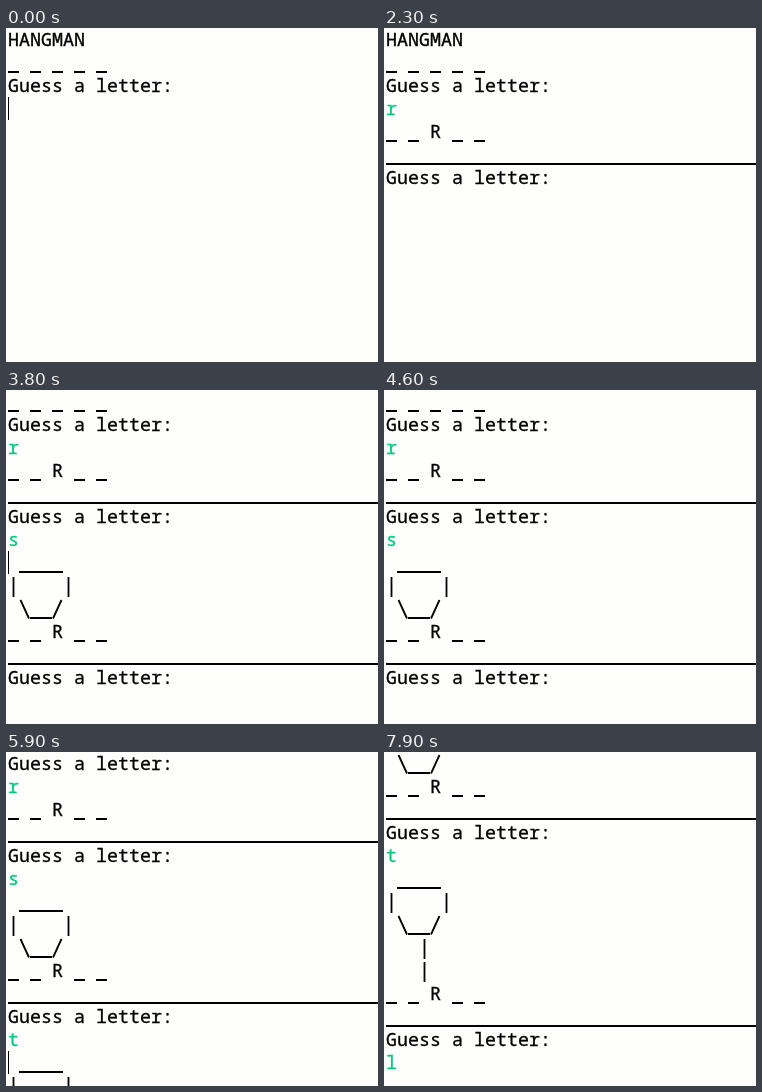
Animation of 372 by 334 pixels, one loop 8 s. Source, as an HTML page:

```html
<!DOCTYPE html>
<html lang="en">
<head>
<meta charset="utf-8">
<title>Hangman console</title>
<style>
  html, body { margin: 0; width: 100%; height: 100%; overflow: hidden; background: #fefefc; }
  svg { display: block; width: 372px; height: 334px; }
  text { font: 18.333px "Noto Sans Mono", "DejaVu Sans Mono", monospace; fill: #000; stroke: #000; stroke-width: .3; }
  path { fill: none; stroke: #000; }
  .under { stroke-width: 2; }
  .stroke { stroke-width: 1.8; }
  .typed { fill: #00c87d; stroke: #00c87d; }

  #page, #caret, .step { animation: 8s step-end infinite; }
  #page { animation-name: scroll; }
  #caret { animation-name: caret; }
  #r { animation-name: type-r; }
  #hit { animation-name: show-hit; }
  #s { animation-name: type-s; }
  #miss1 { animation-name: show-miss1; }
  #t { animation-name: type-t; }
  #miss2 { animation-name: show-miss2; }
  #l { animation-name: type-l; }

  @keyframes type-r     { 0% { visibility: hidden } 8.75%, to { visibility: visible } }
  @keyframes show-hit   { 0% { visibility: hidden } 16.25%, to { visibility: visible } }
  @keyframes type-s     { 0% { visibility: hidden } 37.5%, to { visibility: visible } }
  @keyframes show-miss1 { 0% { visibility: hidden } 44.9%, to { visibility: visible } }
  @keyframes type-t     { 0% { visibility: hidden } 66.25%, to { visibility: visible } }
  @keyframes show-miss2 { 0% { visibility: hidden } 73.65%, to { visibility: visible } }
  @keyframes type-l     { 0% { visibility: hidden } 96.25%, to { visibility: visible } }

  /* The console jumps by whole rows of 23px. */
  @keyframes scroll {
    0%     { transform: translateY(0) }
    46.2%  { transform: translateY(-23px) }
    73.65% { transform: translateY(-46px) }
    74.9%, to { transform: translateY(-230px) }
  }

  /* The caret blinks every 530ms and stays behind until the next click. */
  @keyframes caret {
    0%     { transform: translate(2px, 69px); opacity: 1 }
    6.63%  { opacity: 0 }
    8.75%  { transform: translate(13px, 69px); opacity: 1 }
    15.38% { opacity: 0 }
    16.25% { transform: translate(2px, 92px); opacity: 1 }
    22.88% { opacity: 0 }
    32.5%  { transform: translate(2px, 161px); opacity: 1 }
    37.5%  { transform: translate(13px, 161px); opacity: 1 }
    44.1%  { opacity: 0 }
    44.9%  { transform: translate(2px, 184px); opacity: 1 }
    51.6%  { opacity: 0 }
    58.25% { opacity: 1 }
    61.25% { transform: translate(2px, 322px); opacity: 1 }
    66.25% { transform: translate(13px, 322px); opacity: 1 }
    72.9%  { opacity: 0 }
    73.65% { transform: translate(2px, 345px); opacity: 1 }
    80.4%  { opacity: 0 }
    87%    { opacity: 1 }
    91.25% { transform: translate(2px, 529px); opacity: 1 }
    96.25% { transform: translate(13px, 529px); opacity: 1 }
    97.9%, to { transform: translate(13px, 529px); opacity: 0 }
  }
</style>
</head>
<body>
<svg viewBox="0 0 372 334">
  <defs>
    <text id="ask" x="2" y="18">Guess a letter:</text>
    <!-- Revealed word, rule and the next prompt -->
    <g id="round">
      <path class="under" d="M2 21h11m11 0h11m33 0h11m11 0h11M2 44h370"/>
      <text x="46" y="18">R</text>
      <use href="#ask" y="46"/>
    </g>
    <g id="head">
      <path class="under" d="M13 21h44M24 67h22"/>
      <path class="stroke" d="M7.5 26v20M62.5 26v20M14.5 49l8.5 18.5M55.5 49l-8.5 18.5"/>
    </g>
  </defs>

  <g id="page">
    <text x="2" y="18">HANGMAN</text>
    <path class="under" d="M2 44h11m11 0h11m11 0h11m11 0h11m11 0h11"/>
    <use href="#ask" y="46"/>

    <text class="typed step" id="r" x="2" y="87">r</text>
    <g class="step" id="hit"><use href="#round" y="92"/></g>

    <text class="typed step" id="s" x="2" y="179">s</text>
    <g class="step" id="miss1">
      <use href="#head" y="184"/>
      <use href="#round" y="253"/>
    </g>

    <text class="typed step" id="t" x="2" y="340">t</text>
    <g class="step" id="miss2">
      <use href="#head" y="345"/>
      <path class="stroke" d="M40.5 417v20m0 3v20"/>
      <use href="#round" y="460"/>
    </g>

    <text class="typed step" id="l" x="2" y="547">l</text>
    <rect id="caret" width="1" height="23"/>
  </g>
</svg>
</body>
</html>
```
